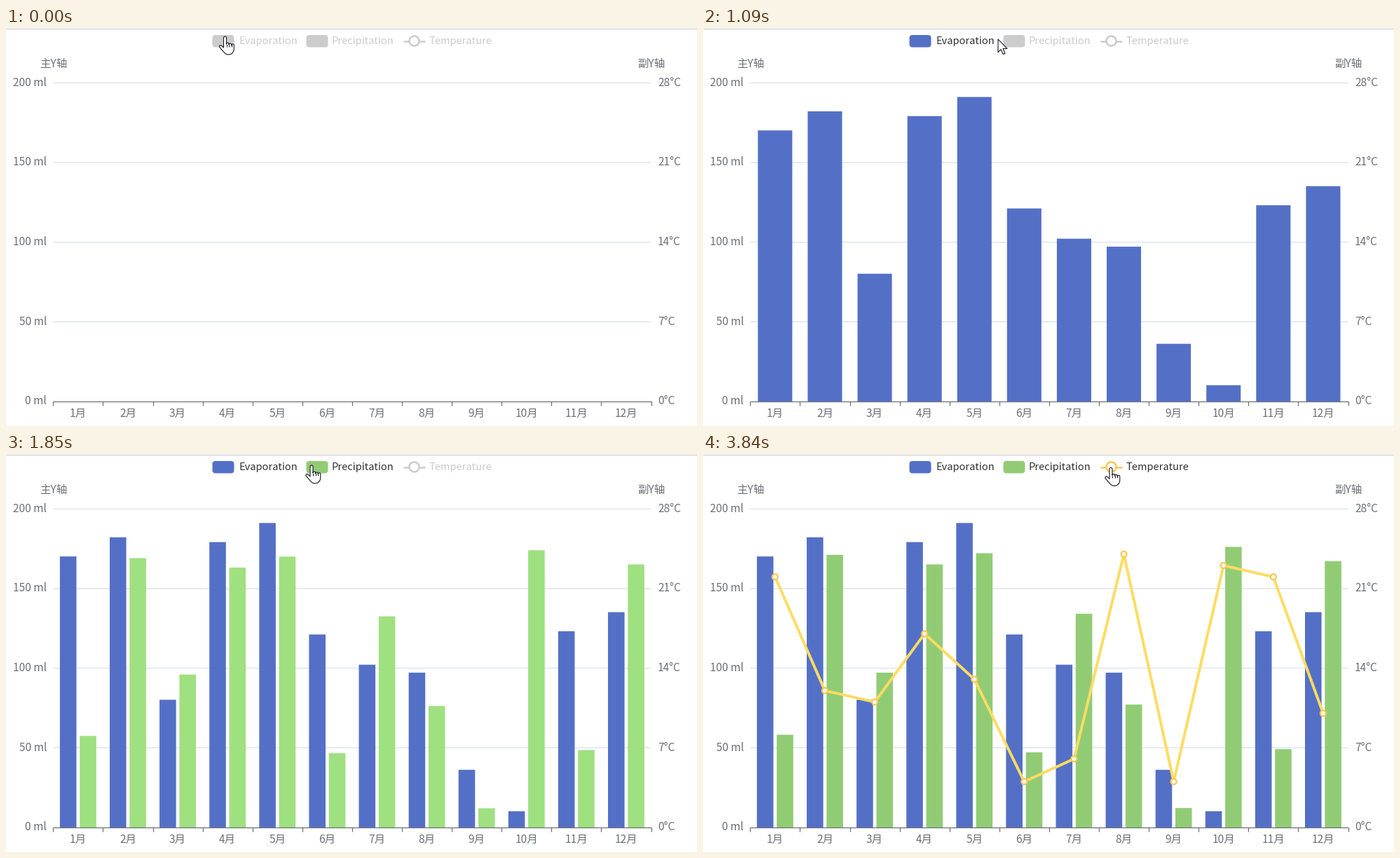
A matplotlib script that plays this animation: 986 px wide and 568 px high, repeating every 4070 ms.

```python
import matplotlib.pyplot as plt
import numpy as np
from matplotlib.animation import FuncAnimation
from matplotlib.patches import Circle, FancyBboxPatch, Polygon, Rectangle

W, H, DPI = 986, 568, 64
PT = 72 / DPI  # points per pixel
LOOP, TICK = 4070, 10

BLUE, GREEN, YELLOW = "#5470c6", "#91cc75", "#fac858"
BLUE_HI, GREEN_HI, YELLOW_HI = "#5c7bd9", "#9fe080", "#ffdc60"
AXIS, GRID, OFF, INK = "#6e7079", "#e0e6f1", "#cccccc", "#333333"
OUTLINE = "#15151f"

LEFT, RIGHT, TOP, BASE = 67.3, 920.5, 78, 532.5
BAND = (RIGHT - LEFT) / 12
XS = LEFT + BAND * (np.arange(12) + 0.5)

# Chart data, one value per month
EVAPORATION = [170, 182, 80, 179, 191, 121, 102, 97, 36, 10, 123, 135]
PRECIPITATION = [58, 171, 97, 165, 172, 47, 134, 77, 12, 176, 49, 167]
TEMPERATURE = [22, 12, 11, 17, 13, 4, 6, 24, 4, 23, 22, 10]
TEMP_Y = BASE - np.array(TEMPERATURE) / 28 * (BASE - TOP)

# After each click the screen refreshes quickly and plays at SPEED
CLICKS = [50, 1690, 3490]
BURST, SPEED = 240, 5

# Pointer path: time, x, y
POINTER = np.array([(390, 312.5, 12), (590, 344, 15), (1090, 421, 16),
                    (1690, 436, 16), (1890, 436, 16), (2290, 495, 18),
                    (2790, 562, 19), (3490, 582, 19.5)])

# Legend items: name, left edge, right edge, text x
LEGEND = [("Evaporation", 294, 417, 332),
          ("Precipitation", 428, 557, 465),
          ("Temperature", 567, 694, 604)]

plt.rcParams["font.family"] = "Noto Sans CJK JP"
fig = plt.figure(figsize=(W / DPI, H / DPI), dpi=DPI, facecolor="white")
ax = fig.add_axes([0, 0, 1, 1])
ax.set_xlim(0, W)
ax.set_ylim(H, 0)
ax.axis("off")


def arc(cx, cy, rx, ry, start, stop):
    a = np.radians(np.linspace(start, stop, 9))
    return np.column_stack([cx + rx * np.cos(a), cy + ry * np.sin(a)])


def hand_shape():
    """Index finger, three knuckles, palm and thumb around the fingertip."""
    parts = [arc(0, 2, 2, 2, 180, 360)]
    parts += [arc(0.2 + 3.6 * k, 10 + 0.9 * k, 1.8, 1.8, 180, 360)
              for k in (1, 2, 3)]
    parts += [arc(5, 18, 7.8, 8, 0, 135), arc(-6.2, 14.4, 1.9, 1.8, 150, 300),
              [(-2, 16)]]
    return np.vstack(parts)


def crease_lines():
    return np.vstack([[(x, 11), (x, 14.6), (np.nan, np.nan)]
                      for x in (2, 5.6, 9.2)])


HAND, CREASES = hand_shape(), crease_lines()
ARROW = np.array([(0, 0), (0, 18.5), (4.2, 14.6), (7.2, 21.5), (10, 20.3),
                  (7.1, 13.6), (13, 13.4)])


def label(x, y, text, size=15.5, color=AXIS, ha="center"):
    return ax.text(x, y, text, fontsize=size * PT, color=color, ha=ha,
                   va="baseline")


def line(xs, ys, color, width, z, **kw):
    return ax.plot(xs, ys, color=color, lw=width * PT, zorder=z,
                   solid_capstyle="butt", solid_joinstyle="round", **kw)[0]


def make_bars():
    return [ax.add_patch(Rectangle((0, 0), 0, 0, lw=0, zorder=3, snap=False))
            for _ in range(12)]


def make_swatch(x):
    return ax.add_patch(FancyBboxPatch(
        (x + 0.5, 10), 31, 17.5, boxstyle="round,pad=0,rounding_size=4.4",
        lw=0, zorder=3, snap=False))


# Axes and labels
line([0, W], [0.5, 0.5], "#c6c6c6", 1, 1)
for i in range(5):
    y = BASE - i * (BASE - TOP) / 4
    if i:
        line([LEFT, RIGHT], [y + 0.4] * 2, GRID, 1.6, 1, snap=False)
    label(58, y + 4.7, f"{50 * i} ml", ha="right")
    label(930, y + 4.7, f"{7 * i}°C", ha="left")
line([LEFT, RIGHT], [BASE + 0.5] * 2, AXIS, 1.25, 4)
for i in range(13):
    line([LEFT + i * BAND] * 2, [BASE + 0.5, BASE + 6.5], AXIS, 1.25, 4)
for i, x in enumerate(XS):
    label(x, 554.5, f"{i + 1}月")
label(LEFT, 56, "主Y轴")
label(RIGHT, 56, "副Y轴")

# Legend
swatches = [make_swatch(left) for _, left, _, _ in LEGEND[:2]]
icon_line = line([567, 598], [18.5, 18.5], OFF, 2.5, 3)
icon_ring = ax.add_patch(Circle((582.5, 18.5), 7, fc="white", ec=OFF,
                                lw=2.5 * PT, zorder=4))
names = [label(x, 23, name, 14.6, OFF, "left") for name, _, _, x in LEGEND]

# Series
blue_bars, green_bars = make_bars(), make_bars()
curve = line([], [], YELLOW, 2.5, 5)
dots = ax.scatter(XS, TEMP_Y, s=0, fc="white", ec=YELLOW, zorder=6)

# Pointer
pointer = ax.add_patch(Polygon(HAND, closed=True, fc="white", ec=OUTLINE,
                               lw=1.1 * PT, joinstyle="round", zorder=10))
creases = line([], [], OUTLINE, 1, 11)


def snap(t):
    """Time of the last screen refresh: every 20 ms in a burst, else 100."""
    idle = (t - 90) // 100 * 100 + 90
    for click in CLICKS:
        if click <= t < click + BURST:
            return click + (t - click) // 20 * 20
        if t >= click + BURST:
            idle = max(idle, click + BURST)
    return idle


def ease(p):
    """Cubic in-out."""
    p = min(max(p, 0), 1)
    return 4 * p ** 3 if p < 0.5 else 1 - 4 * (1 - p) ** 3


def bar_layout(count, index):
    """Offset and width of one bar among several in a band."""
    gap = 0.35 - 0.04 * count
    width = (1 - gap) / (1.2 * count - 0.2)
    return BAND * np.array([gap / 2 + 1.2 * width * index, width])


def place_bars(bars, values, layout, grow, color):
    offset, width = layout
    for i, (bar, value) in enumerate(zip(bars, values)):
        height = grow * value / 200 * (BASE - TOP)
        bar.set_bounds(LEFT + i * BAND + offset, BASE + 0.5 - height - 0.5,
                       width, height + 0.5)
        bar.set_facecolor(color)
        bar.set_visible(grow > 0)


def draw_legend(active):
    blue, green, yellow = (color if on else OFF for color, on
                           in zip((BLUE, GREEN, YELLOW), active))
    for name, on in zip(names, active):
        name.set_color(INK if on else OFF)
    swatches[0].set_facecolor(blue)
    swatches[1].set_facecolor(green)
    icon_line.set_color(yellow)
    icon_ring.set_edgecolor(yellow)


def draw_curve(age, hot):
    end = min(LEFT + (RIGHT - LEFT) * ease(age / 1000), XS[-1])
    xs = np.append(XS[XS < end], end) if end > XS[0] else np.array([])
    curve.set_data(xs, np.interp(xs, XS, TEMP_Y))
    curve.set_color(YELLOW_HI if hot else YELLOW)
    curve.set_linewidth((3.9 if hot else 2.5) * PT)
    delay = 1000 * (XS - LEFT) / (RIGHT - LEFT)
    scale = np.clip((age - delay) / 200, 0, 1)
    dots.set_sizes((8 * PT * scale) ** 2)
    dots.set_linewidths(2.3 * PT * scale)


def draw_pointer(x, y, pointing):
    pointer.set_xy((HAND if pointing else ARROW) + (x, y))
    creases.set_data(*(CREASES + (x, y)).T)
    creases.set_visible(pointing)


def draw(frame):
    t = snap(frame * TICK)
    x, y = (np.interp(t, POINTER[:, 0], POINTER[:, k]) for k in (1, 2))
    hover = [left <= x <= right for _, left, right, _ in LEGEND]
    ages = [(t - click) * SPEED + 55 for click in CLICKS]
    draw_legend([age > 0 for age in ages])

    shift = ease(ages[1] / 500)
    layout = (1 - shift) * bar_layout(1, 0) + shift * bar_layout(2, 0)
    place_bars(blue_bars, EVAPORATION, layout, ease(ages[0] / 1000),
               BLUE_HI if hover[0] else BLUE)
    place_bars(green_bars, PRECIPITATION, bar_layout(2, 1),
               ease(ages[1] / 1000), GREEN_HI if hover[1] else GREEN)
    draw_curve(ages[2], hover[2])
    draw_pointer(x, y, any(hover))
    return []


anim = FuncAnimation(fig, draw, frames=LOOP // TICK, interval=TICK,
                     init_func=lambda: draw(0), repeat=True, repeat_delay=0)
plt.show()
```
